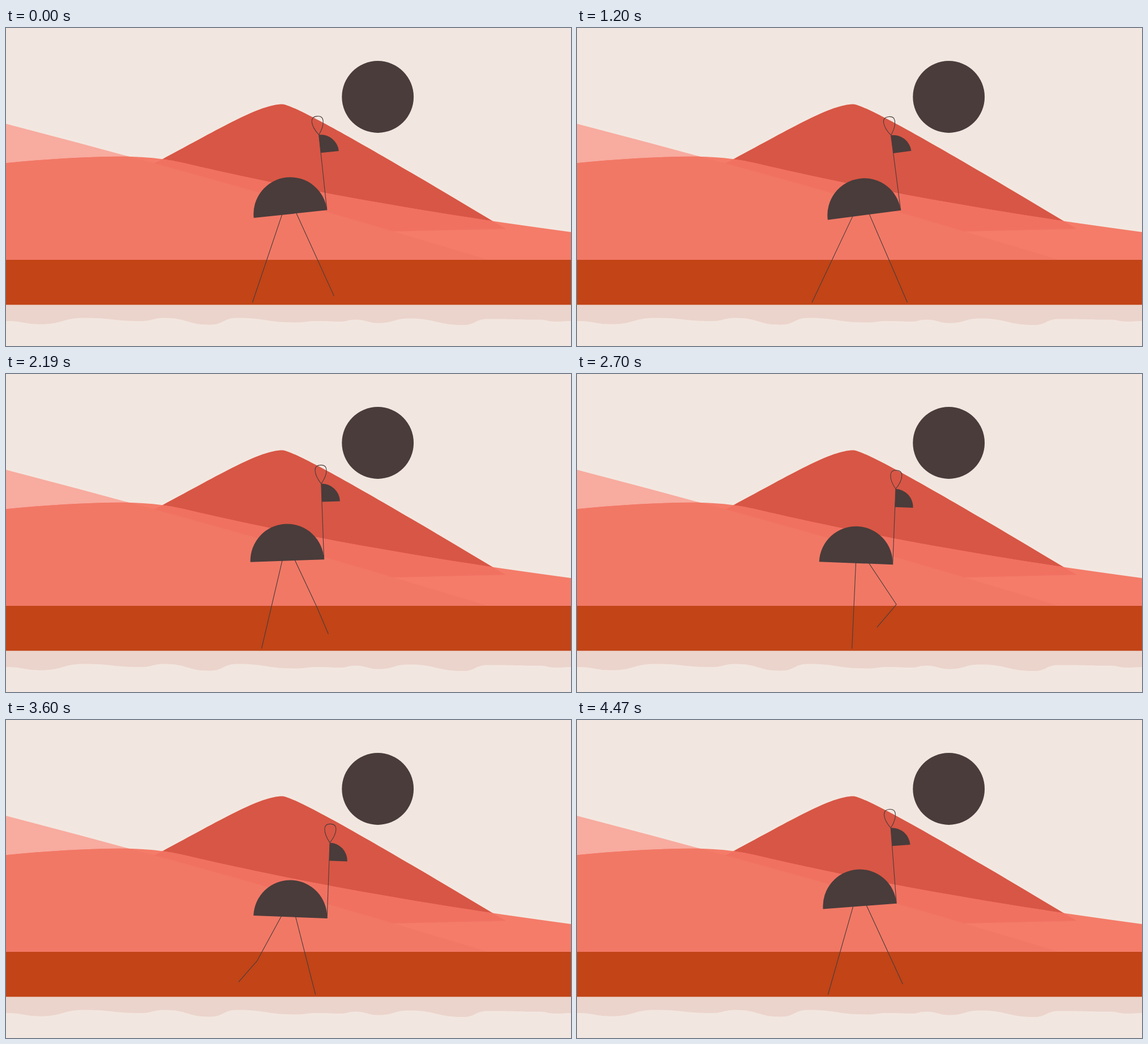
Animation of 998 by 561 pixels, one loop 4.5 s. Source, as an HTML page:

```html
<!DOCTYPE html>
<html lang="en">
<head>
<meta charset="utf-8">
<title>Desert walker</title>
<style>
  html, body { margin: 0; width: 100%; height: 100%; overflow: hidden; background: #f2e7e0; }
  svg { display: block; width: 998px; height: 561px; }
  .dark { fill: #493c3b; }
  .line { fill: none; stroke: #493c3b; stroke-width: 1.1; stroke-linejoin: round; }
</style>
</head>
<body>
<svg viewBox="0 0 998 561" xmlns="http://www.w3.org/2000/svg">
  <defs>
    <path id="peak" d="M250 245L276 231.5C380 176 449 134.5 488 134.5C512 134.5 700 244.8 882.5 354.3L680 359L400 365Z"/>
    <path id="slope" d="M0 169Q439 283.1 850 408.7V412H0Z"/>
    <path id="hill" d="M0 238.2C70 231.5 140 227 200 226.8C240 226.8 275 229 320 239.5C500 281.7 720 323 998 360V410H0Z"/>
    <clipPath id="front"><use href="#hill"/></clipPath>
  </defs>
  <rect width="998" height="561" fill="#f2e7e0"/>
  <circle class="dark" cx="656.7" cy="121.5" r="63.4"/>
  <use href="#peak" fill="#d85645"/>
  <use href="#slope" fill="#f8ab9f"/>
  <use href="#hill" fill="#f47c69"/>
  <g clip-path="url(#front)">
    <use href="#peak" fill="#f17161"/>
    <use href="#slope" fill="#f17865"/>
  </g>
  <path id="shade" fill="#ebd4cc"/>
  <rect y="409" width="998" height="79.3" fill="#c24417"/>
  <path id="legA" class="line"/>
  <path id="legB" class="line"/>
  <g id="body">
    <path class="dark" d="M-65 32.5A65 65 0 0 1 65 32.5Z"/>
    <path class="line" d="M65 32.5V-101"/>
    <g transform="translate(65 -101.1)">
      <path class="dark" d="M0 0A32 32 0 0 1 32 32H0Z"/>
      <path class="line" d="M0 0C-6 -8 -10 -17 -10 -24C-10 -30.5 -6.5 -33 0 -33C6.5 -33 10 -30.5 10 -24C10 -17 6 -8 0 0"/>
    </g>
  </g>
</svg>
<script>
const LOOP = 4500, STRIDE = LOOP / 4, STEP = STRIDE / 2, SWING = 540, TOE_OFF = 112.5;
const GROUND = 484.5, SPAN = 158.5, THIGH = 126.5, SHIN = 52.9;
const $ = id => document.getElementById(id);
const mod = (a, n) => ((a % n) + n) % n;
const wave = (v, peak) => Math.cos(2 * Math.PI * (v - peak) / STEP);

// Easing curve with flat ends; x1 and x2 are the handle positions
function ease(x, x1, x2) {
  let lo = 0, hi = 1, s = x;
  for (let i = 0; i < 24; i++) {
    s = (lo + hi) / 2;
    const r = 1 - s;
    if (3 * x1 * s * r * r + 3 * x2 * s * s * r + s * s * s < x) lo = s; else hi = s;
  }
  return s * s * (3 - 2 * s);
}

// Soft lower edge, swinging between its crests and dips
function drawShade() {
  const turns = [[0, 517], [62, 522.5], [138, 511.5], [238, 517], [280, 511.5], [360, 523.5],
    [408, 511.5], [512, 519.5], [548, 517], [590, 518], [617, 514.5], [658, 520.5],
    [712, 512.5], [808, 524], [850, 513.5], [940, 514.5], [972, 518], [998, 517]];
  let d = "M0 488V517", x0 = 0, y0 = 517;
  for (const [x, y] of turns.slice(1)) {
    const mid = (x0 + x) / 2;
    d += `C${mid} ${y0} ${mid} ${y} ${x} ${y}`;
    [x0, y0] = [x, y];
  }
  $("shade").setAttribute("d", d + "V488Z");
}

function drawLeg(id, hip, time, back) {
  const u = mod(time, STRIDE), swinging = u < SWING, p = u / SWING;
  const reach = swinging ? ease(p, .72, .33) : (STRIDE - u) / (STRIDE - SWING);
  const lift = swinging ? 46 * Math.sin(Math.PI * p ** .93) ** 1.8 : 0;
  const x = back + SPAN * reach, y = GROUND - lift;
  const dx = x - hip.x, dy = y - hip.y, d = Math.hypot(dx, dy);
  const slack = THIGH + SHIN - d;
  let knee = "";
  if (swinging && slack > 0) {
    const a = (d * d + THIGH * THIGH - SHIN * SHIN) / (2 * d);
    const h = Math.sqrt(Math.max(0, THIGH * THIGH - a * a)) * Math.min(1, slack / 15);
    knee = `L${hip.x + (a * dx + h * dy) / d} ${hip.y + (a * dy - h * dx) / d}`;
  }
  $(id).setAttribute("d", `M${hip.x} ${hip.y}${knee}L${x} ${y}`);
}

function draw(t) {
  const v = mod(t, STEP);
  const hip = {
    x: 499.5 + 5.6 * wave(v, 153),
    y: 295.9 + 20 * ease(1 - Math.abs(1 - 2 * v / STEP), .6, .4)
  };
  const tilt = -.1 - 7.45 * wave(v, 58);
  $("body").setAttribute("transform", `translate(${hip.x} ${hip.y}) rotate(${tilt})`);
  drawLeg("legA", hip, t - TOE_OFF, 405);
  drawLeg("legB", hip, t - TOE_OFF - STEP, 425);
}

const start = performance.now();
function tick() {
  draw((performance.now() - start) % LOOP);
  requestAnimationFrame(tick);
}
drawShade();
tick();
</script>
</body>
</html>
```
